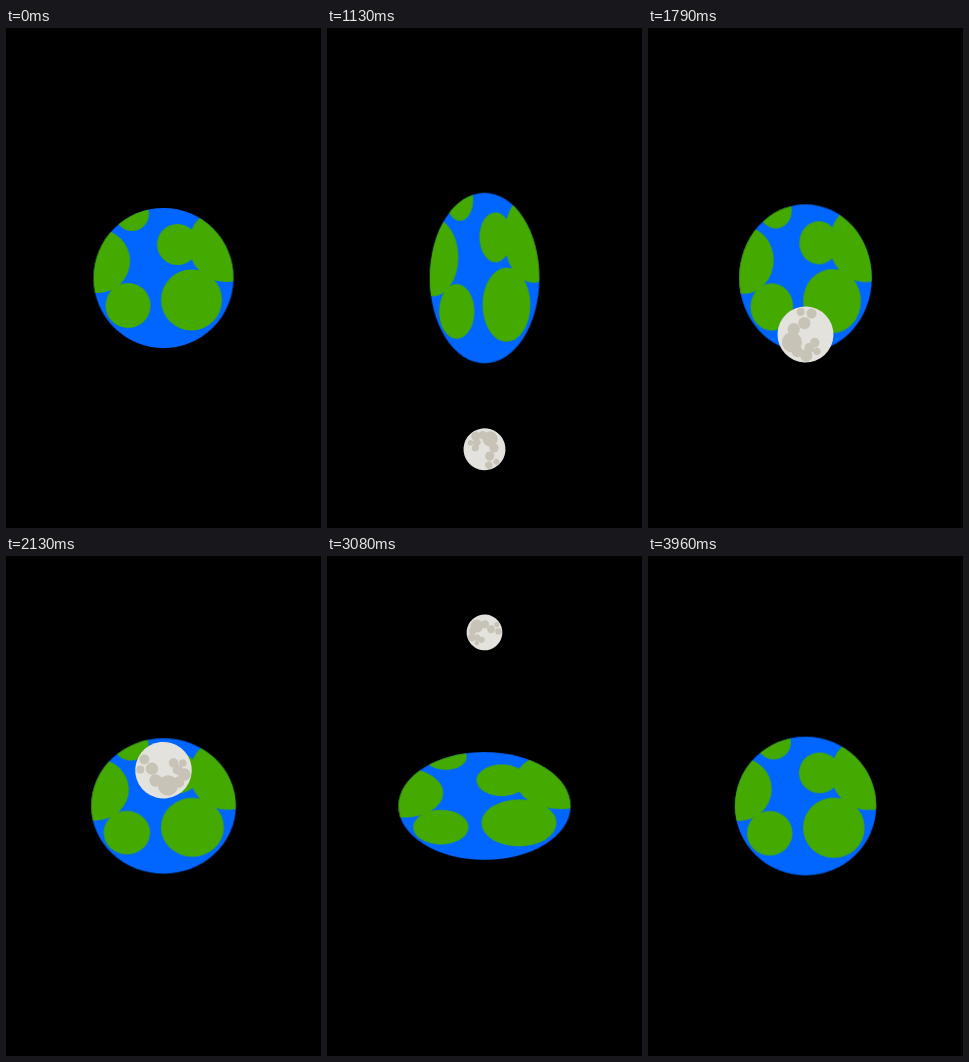
Animation of 315 by 500 pixels, one loop 4000 ms. Source, as an HTML page:

```html
<!DOCTYPE html>
<html lang="en">
<head>
<meta charset="utf-8">
<title>Earth and moon</title>
<style>
  html, body { margin: 0; width: 100%; height: 100%; overflow: hidden; background: #000; }
  svg { position: absolute; left: 0; top: 0; width: 100%; height: 100%; }

  .sky-earth { z-index: 1; }
  .sky-moon { z-index: 0; animation: depth 4s step-end infinite; }

  #earth { animation: squash 4s linear infinite; }

  /* The bezier is a half cosine wave, so both moves are sinusoidal. */
  #moon {
    animation:
      bob 2s cubic-bezier(.3642, 0, .6358, 1) -1s infinite alternate,
      swell 2s cubic-bezier(.3642, 0, .6358, 1) infinite alternate,
      spin 4s linear infinite;
  }

  @keyframes squash {
    0%, 100% { transform: scale(1, 1); }
    25% { transform: scale(.75, 1.25); }
    75% { transform: scale(1.25, .75); }
  }
  @keyframes bob { from { translate: 0 -175px; } to { translate: 0 175px; } }
  @keyframes swell { from { scale: .0964; } to { scale: .285; } }
  @keyframes spin { from { rotate: 0deg; } to { rotate: -900deg; } }
  @keyframes depth {
    0%, 75%, 100% { z-index: 0; }
    25% { z-index: 2; }
  }
</style>
</head>
<body>
<svg class="sky-earth" viewBox="0 0 315 500">
  <clipPath id="globe"><circle r="70"/></clipPath>
  <g transform="translate(157.5 250)">
    <g id="earth">
      <circle r="70" fill="#06f"/>
      <g clip-path="url(#globe)" fill="#4a0">
        <circle cx="-31.5" cy="-64" r="17"/>
        <circle cx="-65.5" cy="-17" r="32"/>
        <circle cx="-35.5" cy="27.5" r="22.5"/>
        <circle cx="28" cy="22" r="30.5"/>
        <circle cx="14" cy="-33.5" r="20.5"/>
        <circle cx="62.5" cy="-33.5" r="37.5"/>
      </g>
    </g>
  </g>
</svg>

<svg class="sky-moon" viewBox="0 0 315 500">
  <g transform="translate(157.5 250)">
    <g id="moon">
      <circle r="100" fill="#e3e2dc"/>
      <!-- Craters: angle, then distance from the centre -->
      <g fill="#c8c3b7">
        <circle transform="rotate(193)" cx="56" r="36"/>
        <circle transform="rotate(247)" cx="46" r="22"/>
        <circle transform="rotate(307)" cx="41" r="22"/>
        <circle transform="rotate(329)" cx="78" r="18"/>
        <circle transform="rotate(301)" cx="82" r="14"/>
        <circle transform="rotate(84)" cx="44" r="17"/>
        <circle transform="rotate(99)" cx="73" r="13"/>
        <circle transform="rotate(117)" cx="50" r="18"/>
        <circle transform="rotate(131)" cx="75" r="22"/>
        <circle transform="rotate(158)" cx="68" r="20"/>
      </g>
    </g>
  </g>
</svg>
</body>
</html>
```
